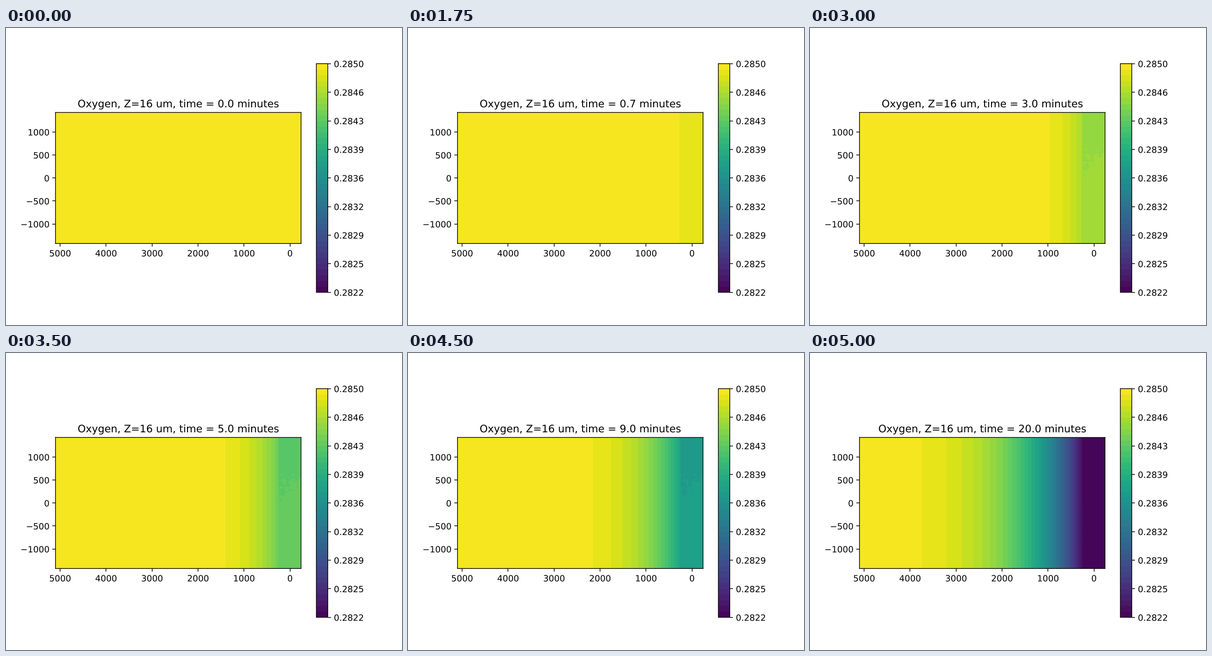
Animation of 864x648 px, one loop 5.25 s. Source, as a matplotlib script:

```python
import math

import matplotlib.pyplot as plt
import numpy as np
from matplotlib import patheffects
from matplotlib.animation import FuncAnimation

# Lines and glyphs keep their exact, unrounded positions.
plt.rcParams["path.snap"] = False
plt.rcParams["path.effects"] = [patheffects.Normal()]

DIFFUSION = 1e5   # um^2 / min
EDGE = 250        # left limit of the consuming layer, um
TOP, STEP, BANDS = 0.28499, 7e-5, 40
FRAMES = 21

LEVELS = TOP - STEP * np.arange(BANDS, -1, -1)

x = np.arange(-240, 5101, 20.0)
y = np.linspace(-1425, 1425, 143)
X, Y = np.meshgrid(x, y)
erfc = np.vectorize(math.erfc)


def minutes(i):
    """Tenths up to one minute, whole minutes up to ten, then twenty."""
    if i <= 10:
        return i / 10
    return 20.0 if i == FRAMES - 1 else i - 9.0


def smooth_noise(seed, passes=2):
    n = np.random.default_rng(seed).normal(size=X.shape)
    for _ in range(passes):
        for axis in (0, 1):
            n = (np.roll(n, 1, axis) + 2 * n + np.roll(n, -1, axis)) / 4
    return n / n.std()


def patchiness():
    """Uneven uptake: high at the top, low at the bottom, mottled between."""
    trend = 0.3 * np.tanh((Y + X - 350) / 200)
    mottle = 0.11 + 0.1 * np.exp(-((Y - 350) / 250) ** 2)
    return np.clip(trend + mottle * smooth_noise(4) * (Y < 700), -0.35, 0.35)


PATCHES = patchiness()
LAYER = np.clip((270 - X) / 30, 0, 1)


def oxygen(t):
    if t == 0:
        return np.full(X.shape, TOP - 0.01 * STEP)
    # Diffusion out of the layer, whose uptake grows linearly in time.
    eta = np.maximum(x - EDGE, 0) / (2 * math.sqrt(DIFFUSION * t))
    fall = (1 + 2 * eta**2) * erfc(eta) - 2 / math.sqrt(math.pi) * eta * np.exp(-eta**2)
    far = t * (1.67 + 0.093 * math.log(t)) * (1 + 0.06 * eta) * fall
    near = min(2 * t, 39.5) + PATCHES * min(1, t)
    loss = far * (1 - LAYER) + near * LAYER
    return TOP - STEP * np.clip(loss, 0.01, BANDS - 0.01)


fig, ax = plt.subplots(figsize=(6.4, 4.8), dpi=135)
ax.set_aspect("equal")
ax.set_xlim(x[-1], x[0])
ax.set_ylim(y[0], y[-1])
title = ax.set_title("")


def fill(t):
    return ax.contourf(X, Y, oxygen(t), levels=LEVELS, cmap="viridis")


field = fill(0)
fig.colorbar(field, ax=ax, ticks=LEVELS[::5], format="%.4f")


def update(i):
    global field
    t = minutes(i)
    field.remove()
    field = fill(t)
    title.set_text(f"Oxygen, Z=16 um, time = {t:.1f} minutes")
    return field, title


anim = FuncAnimation(fig, update, frames=FRAMES, interval=250,
                     repeat=True, repeat_delay=0, blit=False)
plt.show()
```
